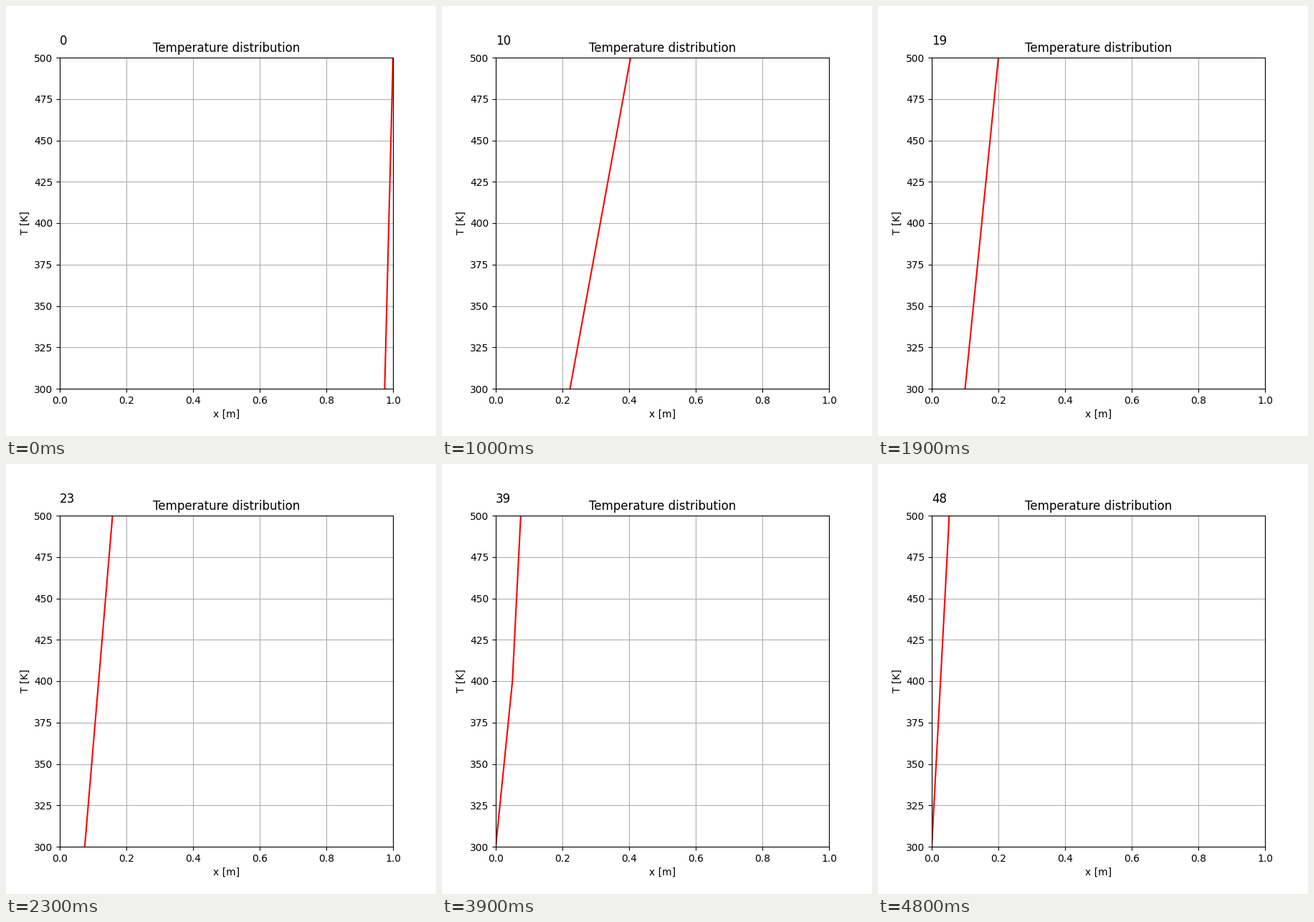
Recreate the animation shown at these times as a matplotlib script. Size 600 by 600 pixels, loop 4.9 s.

```python
import numpy as np
import matplotlib.pyplot as plt
from matplotlib.animation import FuncAnimation

FRAMES = 49
INTERVAL = 100
NODES = 21
T_LEFT, T_RIGHT = 300, 500

x = np.linspace(0, 1, NODES)


def temperature(step):
    """Interior nodes heat up linearly; both ends are held fixed."""
    t = 5.0 * (step + 1) * (np.arange(NODES) + 1)
    t[0], t[-1] = T_LEFT, T_RIGHT
    return t


fig, ax = plt.subplots(figsize=(6, 6), dpi=100)
ax.set(xlim=(0, 1), ylim=(300, 500), xlabel="x [m]", ylabel="T [K]",
       title="Temperature distribution")
ax.grid(True)

line, = ax.plot(x, temperature(0), color="red", lw=1.5)
counter = ax.text(0, 1.04, "0", transform=ax.transAxes, fontsize=12)


def update(step):
    line.set_ydata(temperature(step))
    counter.set_text(str(step))
    return line, counter


anim = FuncAnimation(fig, update, frames=FRAMES, interval=INTERVAL,
                     repeat=True, repeat_delay=0)
plt.show()
```
